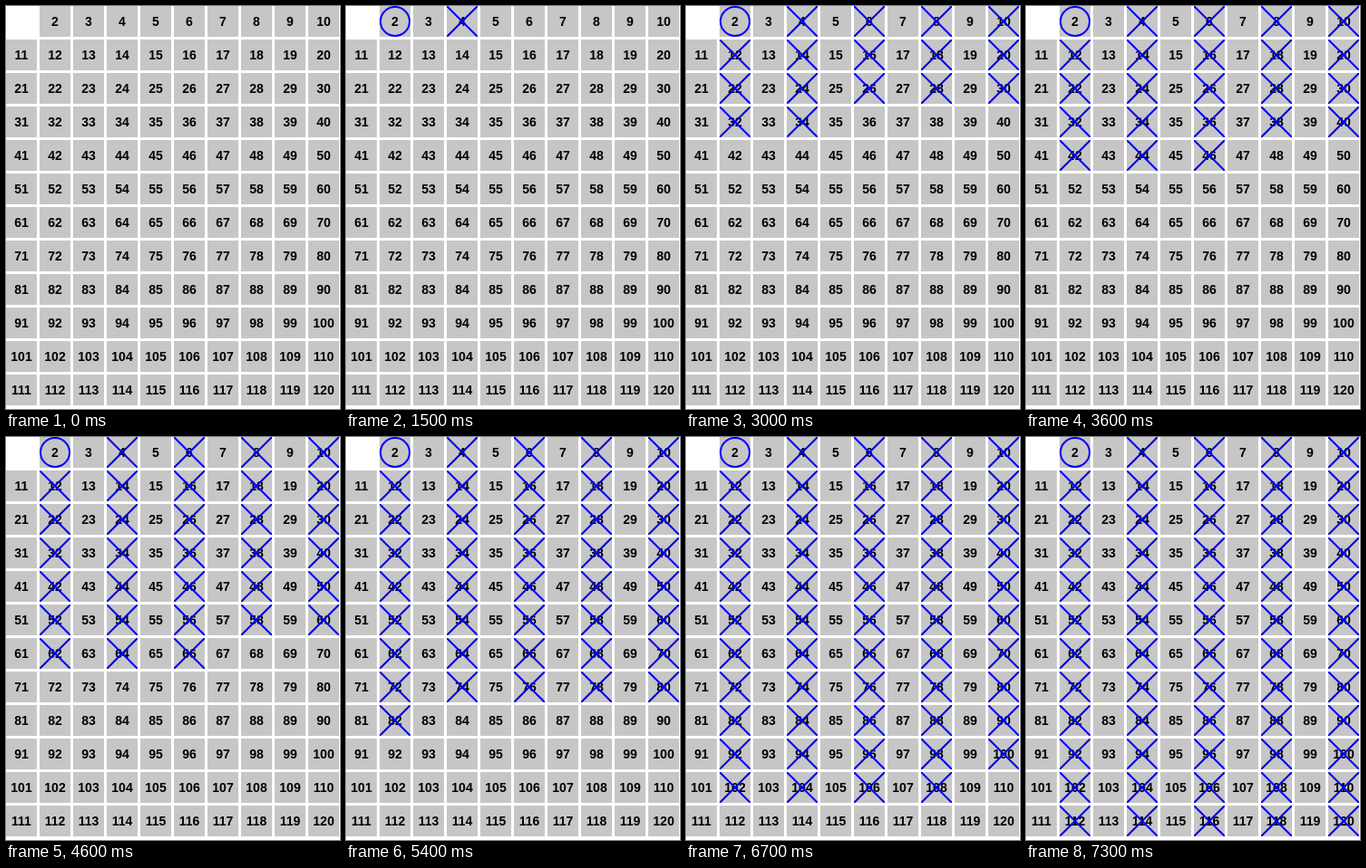
Animation of 368x445 px, one loop 8 s. Source, as an HTML page:

```html
<!DOCTYPE html>
<html lang="en">
<head>
<meta charset="utf-8">
<title>Crossing out the multiples of two</title>
<style>
html, body { margin: 0; width: 100%; height: 100%; overflow: hidden; background: #fff; }
svg { display: block; }
rect { fill: #c6c6c6; }
text { font: bold 14px "Liberation Sans", Arial, sans-serif; text-anchor: middle; }
.mark { fill: none; stroke: #00f; stroke-width: 2; }
.slash { stroke: #0000dc; }
</style>
</head>
<body>
<svg id="grid" width="368" height="445" viewBox="0 0 368 445"></svg>
<script>
const PITCH = 37, SIZE = 34, LAST = 120, LOOP = 8000;
const CIRCLE_AT = 500, CROSS_AT = 1500, STEP = 100;
const grid = document.getElementById("grid");
const marks = [];

function add(parent, tag, attrs = {}) {
  const node = document.createElementNS("http://www.w3.org/2000/svg", tag);
  for (const key in attrs) node.setAttribute(key, attrs[key]);
  return parent.appendChild(node);
}

function addMark(cell, n) {
  // A nested svg clips the strokes to the cell.
  const node = add(cell, "svg", { width: SIZE, height: SIZE, class: "mark" });
  if (n === 2) {
    add(node, "circle", { cx: 17, cy: 17, r: 16 });
  } else {
    add(node, "path", { d: "M0 34L34 0", class: "slash" });
    add(node, "path", { d: "M0 0L34 34" });
  }
  const at = n === 2 ? CIRCLE_AT : CROSS_AT + (n / 2 - 2) * STEP;
  marks.push({ node, at });
}

for (let n = 2; n <= LAST; n++) {
  const x = (n - 1) % 10 * PITCH, y = Math.floor((n - 1) / 10) * PITCH;
  const cell = add(grid, "g", { transform: `translate(${x} ${y})` });
  add(cell, "rect", { width: SIZE, height: SIZE });
  add(cell, "text", { x: 17, y: 22 }).textContent = n;
  if (n % 2 === 0) addMark(cell, n);
}

function draw() {
  const t = performance.now() % LOOP;
  for (const { node, at } of marks) {
    node.style.visibility = t >= at ? "visible" : "hidden";
  }
  requestAnimationFrame(draw);
}
draw();
</script>
</body>
</html>
```
